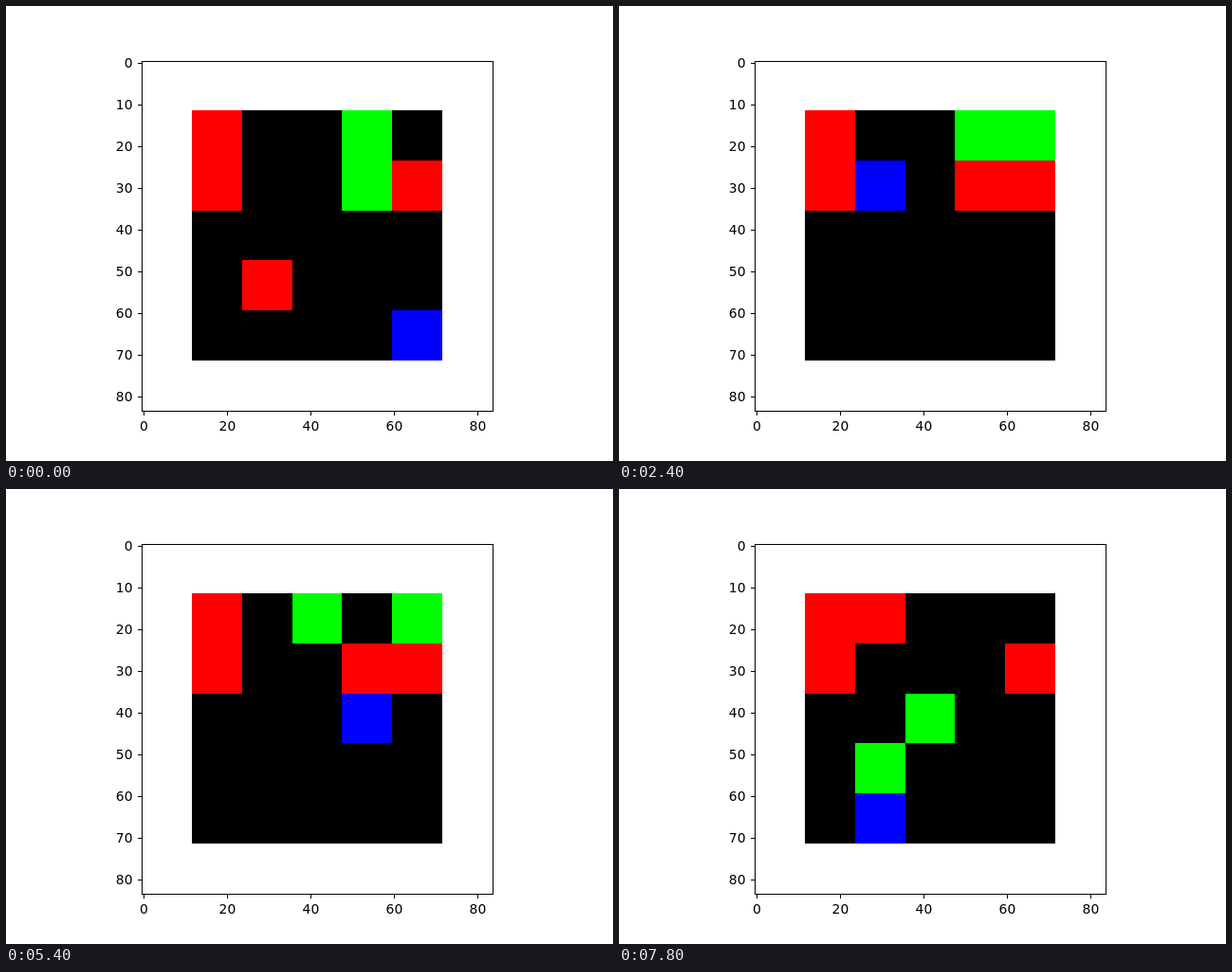
An HTML page for the animation above (8000 ms loop, 640 by 480 pixels).

```html
<!DOCTYPE html>
<html lang="en">
<head>
<meta charset="utf-8">
<title>Grid world</title>
<style>
  html, body { margin: 0; width: 100%; height: 100%; overflow: hidden; background: #fff; }
  svg { display: block; width: 640px; height: 480px; }
  text { font: 13.889px "DejaVu Sans", sans-serif; }
</style>
</head>
<body>
<svg id="stage" viewBox="0 0 640 480">
  <rect x="196" y="110" width="264" height="264" shape-rendering="crispEdges"/>
  <g id="cells" shape-rendering="crispEdges"></g>
  <g id="axes" fill="none" stroke="#000" shape-rendering="crispEdges">
    <rect x="143.5" y="58.5" width="370" height="369"/>
  </g>
  <g id="labels"></g>
</svg>
<script>
const STEP = 200;
const MOVES = "ULUUDDLLLURURURRLLDUDDRDDUUUURLLDLDLDDR";
const DIRS = { U: [0, -1], D: [0, 1], L: [-1, 0], R: [1, 0] };
const RED = "#f00", GREEN = "#0f0", BLUE = "#00f";

const byId = id => document.getElementById(id);

function add(parent, tag, attrs, text = "") {
  const el = document.createElementNS("http://www.w3.org/2000/svg", tag);
  for (const key in attrs) el.setAttribute(key, attrs[key]);
  el.textContent = text;
  parent.append(el);
  return el;
}

// Column and row pairs
const cells = text => text.split(" ").map(pair => [...pair].map(Number));

// A tile the agent steps on jumps to the next of these cells
const spawns = cells("33 03 31 40 32 34 20 40 10 04 02 13 22");
const colors = [RED, RED, RED, RED, GREEN, GREEN, BLUE];

function simulate() {
  let state = cells("00 01 41 13 30 31 44");
  const states = [state];
  let next = 0;
  for (const move of MOVES) {
    const [x, y] = state[6];
    const agent = [x + DIRS[move][0], y + DIRS[move][1]];
    const tiles = state.slice(0, 6).map(tile =>
      tile[0] === agent[0] && tile[1] === agent[1] ? spawns[next++] : tile);
    state = [...tiles, agent];
    states.push(state);
  }
  return states;
}

function drawAxes() {
  const axes = byId("axes"), labels = byId("labels");
  for (let v = 0; v <= 80; v += 20) {
    const x = 145.4 + v * 4.4;
    add(axes, "path", { d: `M${Math.floor(x) + 0.5} 428v4` });
    add(labels, "text", { x, y: 448, "text-anchor": "middle" }, v);
  }
  for (let v = 0; v <= 80; v += 10) {
    const y = 60.5 + v * 4.4;
    add(axes, "path", { d: `M139 ${y}h4` });
    add(labels, "text", { x: 133.5, y: y + 4.5, "text-anchor": "end" }, v);
  }
}

const edge = (start, i) => Math.round(start + i * 52.8);

function place(rect, [col, row]) {
  const x = edge(196, col), y = edge(110, row);
  rect.setAttribute("x", x);
  rect.setAttribute("y", y);
  rect.setAttribute("width", edge(196, col + 1) - x);
  rect.setAttribute("height", edge(110, row + 1) - y);
}

const states = simulate();
const rects = colors.map(fill => add(byId("cells"), "rect", { fill }));

function render(time) {
  const state = states[Math.floor(time / STEP) % states.length];
  rects.forEach((rect, i) => place(rect, state[i]));
}

drawAxes();
render(0);
const start = performance.now();
function tick() {
  render(performance.now() - start);
  requestAnimationFrame(tick);
}
requestAnimationFrame(tick);
</script>
</body>
</html>
```
